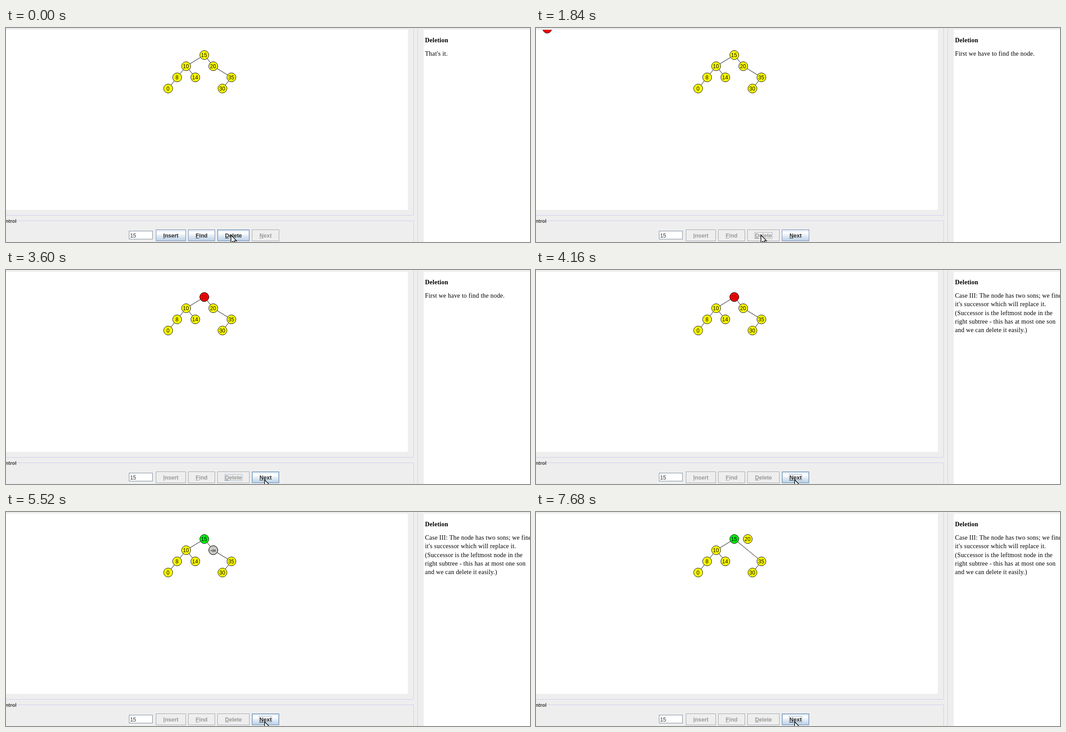
Recreate the animation shown at these times as an HTML page with a canvas. Size 1168 px wide and 479 px high, loop 8000 ms.

```html
<!DOCTYPE html>
<html lang="en">
<head>
<meta charset="utf-8">
<title>Tree deletion</title>
<style>
  html, body { margin: 0; width: 1168px; height: 479px; overflow: hidden; background: #eee; }
  canvas { display: block; }
</style>
</head>
<body>
<canvas id="stage" width="1168" height="479"></canvas>
<script>
const ctx = document.getElementById('stage').getContext('2d');
const LOOP = 8000, TICK = 80;
const SANS = '"Liberation Sans", Arial, sans-serif';
const SERIF = '"Liberation Serif", "Times New Roman", serif';
const YELLOW = '#ffff00', RED = '#fb0606', GREEN = '#00f010', GREY = '#c8cac4';

// key: [x, y, parent]
const TREE = {
  15: [442, 60.5], 10: [401.5, 85.5, 15], 20: [462, 85.5, 15],
  8: [381.5, 110.5, 10], 14: [422, 110.5, 10], 35: [502.5, 110.5, 20],
  0: [361.5, 135.5, 8], 30: [482.5, 135.5, 35]
};
const ROOT = TREE[15], SUCC = TREE[20];

const CASE_TEXT = [
  'Case III: The node has two sons; we find',
  "it's successor which will replace it.",
  '(Successor is the leftmost node in the',
  'right subtree - this has at most one son',
  'and we can delete it easily.)'
];

const clamp = v => Math.max(0, Math.min(1, v));
const span = (t, a, b) => clamp((t - a) / (b - a));
const mix = (a, b, k) => a + (b - a) * k;

function rect(x, y, w, h, fill) {
  ctx.fillStyle = fill;
  ctx.fillRect(x, y, w, h);
}

function frame(x, y, w, h, color) {
  ctx.strokeStyle = color;
  ctx.lineWidth = 1;
  ctx.strokeRect(x + 0.5, y + 0.5, w - 1, h - 1);
}

function line(x1, y1, x2, y2, color) {
  ctx.strokeStyle = color;
  ctx.lineWidth = 1;
  ctx.beginPath();
  ctx.moveTo(x1, y1);
  ctx.lineTo(x2, y2);
  ctx.stroke();
}

function text(str, x, y, font, color, align = 'left', spacing = '0px') {
  ctx.font = font;
  ctx.fillStyle = color;
  ctx.textAlign = align;
  ctx.letterSpacing = spacing;
  ctx.fillText(str, x, y);
}

function node(x, y, label, fill, ink = '#000') {
  ctx.beginPath();
  ctx.arc(x, y, 10, 0, Math.PI * 2);
  ctx.fillStyle = fill;
  ctx.fill();
  ctx.strokeStyle = '#000';
  ctx.lineWidth = 1;
  ctx.stroke();
  text(label, x - 0.5, y + 4.5, '12px ' + SANS, ink, 'center');
}

function panels() {
  rect(0, 0, 1168, 479, '#eeeeee');
  rect(0, 4, 895.5, 403, '#fff');
  rect(931, 4, 237, 475, '#fff');
  const c = '#cdcdf2';
  line(908.5, 0, 908.5, 419, c);
  line(0, 419.5, 908, 419.5, c);
  line(24, 431.5, 908, 431.5, c);
  line(908.5, 431, 908.5, 479, c);
  line(917.5, 0, 917.5, 479, c);
  text('ntrol', 23.3, 435.5, 'bold 11px ' + SANS, '#333', 'right');
}

function drawTree(t) {
  const detached = t >= 6960;
  ctx.save();
  ctx.beginPath();
  ctx.rect(0, 4, 895.5, 403);
  ctx.clip();

  for (const key in TREE) {
    let [x, y, parent] = TREE[key];
    if (parent === undefined || (detached && key === '20')) continue;
    if (detached && parent === 20) parent = 15;
    line(x, y, TREE[parent][0], TREE[parent][1], '#000');
  }
  for (const key in TREE) {
    if (detached && key === '20') continue;
    const fill = key === '15' && t >= 4240 ? GREEN : YELLOW;
    node(TREE[key][0], TREE[key][1], key, fill);
  }

  if (t >= 1680 && t < 4240) {
    const k = (t - 1840) / 400;
    node(mix(25, ROOT[0], Math.min(1, k)), mix(1.5, ROOT[1], Math.min(1, k)), '15', RED, '#a00000');
  } else if (t >= 4240 && !detached) {
    const k = span(t, 4160, 4400);
    node(mix(ROOT[0], SUCC[0], k), mix(ROOT[1], SUCC[1], k), '-∞', GREY);
  } else if (detached) {
    const k = t < 7280 ? 0.3 * span(t, 7000, 7120) : mix(0.3, 1, span(t, 7200, 7680));
    node(mix(SUCC[0], 472, k), mix(SUCC[1], ROOT[1], k), '20', YELLOW);
  }
  ctx.restore();
}

function button(label, x, w, { on, hover, down, focus }) {
  const y = 451, h = 26, mid = x + w / 2;
  if (on) {
    const g = ctx.createLinearGradient(0, y, 0, y + h);
    g.addColorStop(0, '#dde8f3');
    g.addColorStop(0.3, '#ffffff');
    g.addColorStop(0.6, '#dde8f3');
    g.addColorStop(1, '#b8cfe5');
    rect(x, y, w, h, down ? '#b9cbe9' : g);
    frame(x, y, w, h, down ? '#7a8a99' : hover ? '#6f93b5' : '#7a88ad');
    if (hover && !down) frame(x + 1, y + 1, w - 2, h - 2, '#a9c3df');
  } else {
    frame(x, y, w, h, '#a3a5aa');
  }
  const ink = on ? '#2b2b2b' : '#999999';
  const font = 'bold 12.5px ' + SANS;
  text(label, mid, 469.3, font, ink, 'center');
  const left = mid - ctx.measureText(label).width / 2;
  rect(left, 470, ctx.measureText(label[0]).width, 1, ink);
  if (focus) {
    const fw = Math.round(ctx.measureText(label).width) + 2;
    frame(Math.round(left) - 1, 457, fw, 15, focus);
  }
}

function controls(t) {
  const idle = t < 1680;
  rect(274, 454, 53, 19, '#fff');
  frame(274, 454, 53, 19, '#7a8a99');
  text('15', 276.7, 469, '12px ' + SANS, '#333');

  button('Insert', 334, 67, { on: idle });
  button('Find', 406, 60, { on: idle });
  button('Delete', 471, 72, {
    on: idle,
    hover: idle,
    down: t >= 1440 && idle,
    focus: idle || t >= 4160 ? null : t < 2160 ? '#b4b6ba' : '#a9bad0'
  });
  button('Next', 548, 61, {
    on: !idle,
    hover: t >= 2160,
    down: t >= 6320 && t < 6960,
    focus: t >= 4160 ? '#a3b8cc' : null
  });
}

function sidebar(t) {
  const lines = t < 1680 ? ["That's it."]
    : t < 4160 ? ['First we have to find the node.'] : CASE_TEXT;
  text('Deletion', 934, 32.3, 'bold 14px ' + SERIF, '#000', 'left', '0.25px');
  lines.forEach((s, i) => text(s, 934, 62.3 + i * 19.1, '14px ' + SERIF, '#000', 'left', '0.22px'));
}

function cursor(t) {
  const p = span(t, 1840, 2400);
  const k = p * p * (3 - 2 * p);
  ctx.save();
  ctx.translate(mix(501.5, 576.5, k), mix(463.5, 469.5, k));
  ctx.beginPath();
  ctx.moveTo(0, 0);
  for (const [x, y] of [[0, 18], [4, 14], [7, 20], [10, 19], [7, 13], [12.5, 13]]) ctx.lineTo(x, y);
  ctx.closePath();
  ctx.fillStyle = '#fff';
  ctx.fill();
  ctx.strokeStyle = '#000';
  ctx.lineWidth = 1.4;
  ctx.stroke();
  ctx.restore();
}

function draw(now) {
  const t = Math.floor((now % LOOP) / TICK) * TICK;
  panels();
  drawTree(t);
  controls(t);
  sidebar(t);
  cursor(t);
}

const start = performance.now();
function loop() {
  draw(performance.now() - start);
  requestAnimationFrame(loop);
}
loop();
</script>
</body>
</html>
```
